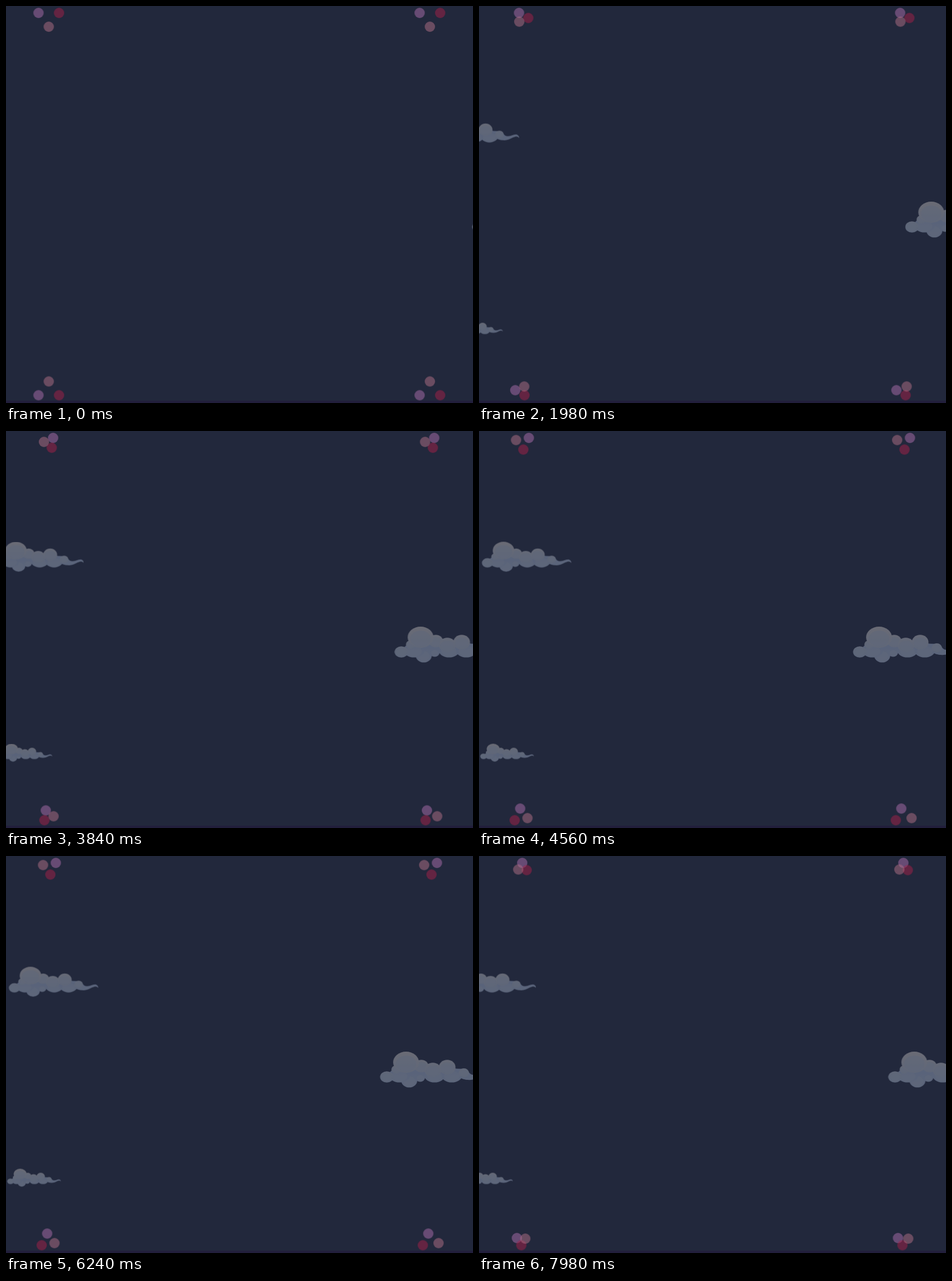
Write an HTML page that moves like this. It is 812 by 690 pixels and loops after 8000 ms.

```html
<!DOCTYPE html>
<html lang="en">
<head>
<meta charset="utf-8">
<title>Night clouds</title>
<style>
  html, body { margin: 0; width: 100%; height: 100%; overflow: hidden; background: #22283c; }
  svg { display: block; width: 100%; height: 100%; }
</style>
</head>
<body>
<svg id="stage" viewBox="0 0 812 690">
  <defs>
    <linearGradient id="upper" gradientUnits="userSpaceOnUse" x1="0" y1="0" x2="0" y2="50">
      <stop offset="0" stop-color="#6a6b75"/>
      <stop offset="1" stop-color="#5c667a"/>
    </linearGradient>
    <linearGradient id="lower" gradientUnits="userSpaceOnUse" x1="0" y1="34" x2="0" y2="62">
      <stop offset="0" stop-color="#59637a"/>
      <stop offset="1" stop-color="#5d667b"/>
    </linearGradient>
    <g id="cloud">
      <path fill="url(#lower)" d="M19 36L27 28H60L149 30C154 34 154 40 162 40.5C169 41 173 37 179 37C183 37 186 40 186 44C182 40 178 41 174 43C166 47 160 50 152 49C146 49 142 47 140 46H26Z"/>
    </g>
  </defs>
  <rect width="812" height="690" fill="#22283c"/>
  <rect y="686" width="812" height="4" fill="#221f3c"/>
</svg>
<script>
const LOOP = 8000, TURN = 5400;
const stage = document.getElementById('stage');
const cloud = document.getElementById('cloud');

function add(parent, tag, attrs) {
  const el = document.createElementNS('http://www.w3.org/2000/svg', tag);
  for (const key in attrs) el.setAttribute(key, attrs[key]);
  return parent.appendChild(el);
}

const mix = (a, b, t) => a.map((v, i) => v + (b[i] - v) * t);

// Travels from a to b, turns around, and is cut off on the way back.
function shuttle(el, a, b) {
  const at = ([x, y], offset) => ({ transform: `translate(${x}px, ${y}px)`, offset });
  const cut = mix(b, a, (LOOP - TURN) / TURN);
  el.animate([at(a, 0), at(b, TURN / LOOP), at(cut, 1)], { duration: LOOP, iterations: Infinity });
}

// A puff is a squashed circle with a cooler, smaller one inside.
function puff(fill, squash, cx, cy, r) {
  add(cloud, 'ellipse', { cx, cy, rx: r, ry: r * squash, fill });
  add(cloud, 'ellipse', { cx, cy: cy + r * 0.1, rx: r * 0.78, ry: r * squash * 0.74, fill: '#5f687a', 'fill-opacity': 0.6 });
}

const LOWER = 'url(#lower)', UPPER = 'url(#upper)';
puff(LOWER, 0.88, 50, 50, 14);
puff(LOWER, 0.88, 69, 45, 8.5);
for (const x of [33, 94, 124]) puff(LOWER, 0.7, x, 41, 18);
puff(UPPER, 0.84, 11, 44, 11.6);
puff(UPPER, 0.88, 27, 31, 8);
puff(UPPER, 0.88, 71, 25, 12.3);
puff(UPPER, 0.88, 91, 32, 14.5);
puff(UPPER, 0.88, 116, 27, 14.5);
puff(UPPER, 0.88, 145, 37, 9);
puff(UPPER, 0.82, 44.5, 18.5, 22.5);

function drift(y, scale, from, to) {
  const group = add(stage, 'g', {});
  add(group, 'use', { href: '#cloud', transform: `scale(${scale})` });
  shuttle(group, [from, y], [to, y]);
}
drift(192.5, 5 / 6, -155, 35);
drift(340, 1, 811.5, 621.5);
drift(543.5, 1 / 2, -93.5, 20);

function dot(fill, a, b) {
  shuttle(add(stage, 'circle', { r: 9, fill, 'fill-opacity': 0.5 }), a, b);
}

// Dots swap the corners of a triangle; the rose one may stop short of its corner.
const SIDE = 35.7, HEIGHT = 24;
function trio(x, y, up, roseReach) {
  const left = [x, y], right = [x + SIDE, y];
  const tip = [x + SIDE / 2, y + (up ? -HEIGHT : HEIGHT)];
  const roseEnd = up ? right : left;
  dot('#ac6eac', left, up ? tip : right);
  dot('#a62048', right, up ? left : tip);
  dot('#b27086', tip, [tip[0] + (roseEnd[0] - tip[0]) * roseReach, y]);
}
for (const x of [56.5, 719.2]) {
  trio(x, 12, false, 0.66);
  trio(x, 676.5, true, x < 406 ? 0.66 : 1);
}
</script>
</body>
</html>
```
